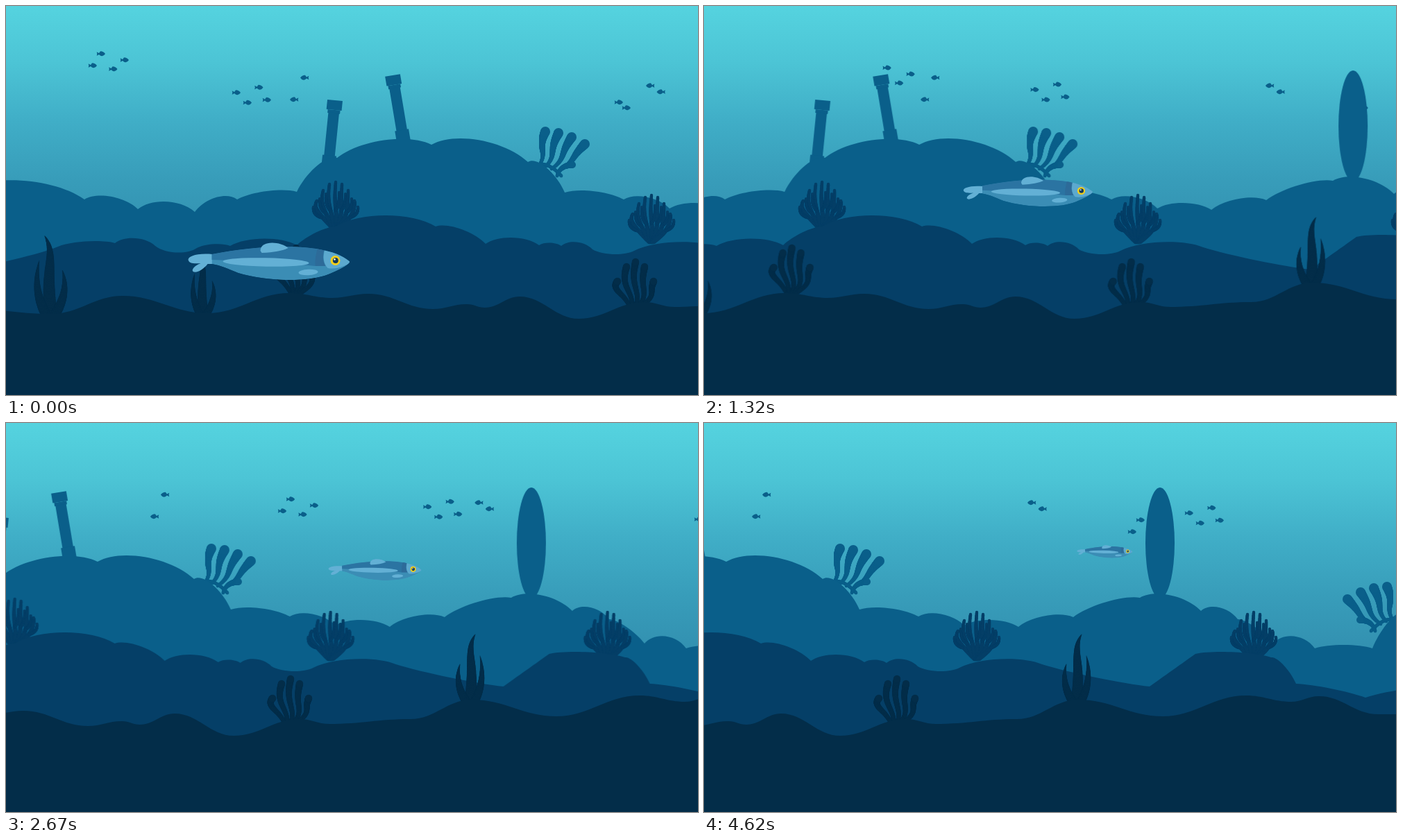
An HTML page with a canvas that plays this animation: 997 px wide and 561 px high, repeating every 4.65 s.

```html
<!DOCTYPE html>
<html lang="en">
<head>
<meta charset="utf-8">
<title>Under the sea</title>
<style>
html, body { margin: 0; width: 100%; height: 100%; overflow: hidden; background: #032d49; }
canvas { display: block; }
</style>
</head>
<body>
<canvas id="stage" width="997" height="561"></canvas>
<script>
const W = 997, H = 561, LOOP = 4650, STEP = 30, WORLD = 1700;
const FAR = '#0a5f8a', MID = '#053f67', NEAR = '#032d49';
const ctx = document.getElementById('stage').getContext('2d');

// Goes 0 to 1: linear, plus an early lead p that changes by q over the loop
const ease = (s, p = 0, q = 0) => s + s * (1 - s) * (p + q * s);

function layer(color, paint) {
  const c = document.createElement('canvas');
  c.width = WORLD; c.height = H;
  const g = c.getContext('2d');
  g.fillStyle = color;
  paint(g);
  return c;
}

function placed(g, x, y, sx, sy, paint) {
  g.save();
  g.translate(x, y);
  g.scale(sx, sy);
  paint();
  g.restore();
}

// Row of curves: each [end x, end y, rise of its middle over the chord]
function bumps(g, x, y, arcs) {
  g.beginPath();
  g.moveTo(x, y);
  for (const [ex, ey, rise] of arcs) {
    const dx = (ex - x) * 0.24, dy = (ey - y) * 0.24, lift = rise * 4 / 3;
    g.bezierCurveTo(x + dx, y + dy - lift, ex - dx, ey - dy - lift, ex, ey);
    x = ex; y = ey;
  }
  g.lineTo(WORLD, H); g.lineTo(-60, H); g.fill();
}

// Soft ground through its crests and valleys
function dunes(g, extrema) {
  g.beginPath();
  let [x, y] = extrema[0];
  g.moveTo(x, y);
  for (const [ex, ey] of extrema) {
    const bend = (ex - x) * 0.4;
    g.bezierCurveTo(x + bend, y, ex - bend, ey, ex, ey);
    x = ex; y = ey;
  }
  g.lineTo(WORLD, H); g.lineTo(-60, H); g.fill();
}

// Stem along a quadratic curve; its radius changes mostly near the tip
function limb(g, x0, y0, cx, cy, x1, y1, r0, r1, wave = 0) {
  for (let i = 0; i <= 60; i++) {
    const t = i / 60, s = 1 - t;
    g.beginPath();
    g.arc(s * s * x0 + 2 * s * t * cx + t * t * x1 + wave * Math.sin(t * 2 * Math.PI),
          s * s * y0 + 2 * s * t * cy + t * t * y1, r0 + (r1 - r0) * t ** 1.6, 0, 7);
    g.fill();
  }
}

function twigCoral(g, x, y) {
  for (let i = -3; i <= 3; i++) {
    const side = i < 0 ? -1 : 1, tip = 67 - 3 * i * i;
    limb(g, x + i, y, x + i * 11, y - 25, x + i * 9, y - tip, 3.2, 2.2, 1);
    limb(g, x + i * 7, y - tip * 0.4, x + i * 9 + side * 6, y - tip * 0.5,
         x + i * 9 + side * 5, y - tip * 0.78, 2.4, 2);
  }
}

function clubCoral(g, x, y) {
  for (let i = -2; i <= 2; i++)
    limb(g, x + i * 4, y, x + i * 15, y - 22, x + i * 13, y - 64 + 7 * i * i, 3, 5.2, 2.5);
}

function fanCoral(g, x, y, dir) {
  placed(g, x, y, dir, 1, () => {
    g.beginPath(); g.rect(0, 0, 80, 90); g.clip();
    for (let i = 0; i < 4; i++)
      limb(g, 2 + 8 * i, 54 + 4 * i, 4 + 16 * i, 36 + 4 * i, 9 + 19 * i, 8 + 2 * i * i, 2.4, 7, 2);
    limb(g, 0, 55, 16, 54, 32, 72, 2.4, 2.4);
    limb(g, 26, 72, 30, 57, 48, 56, 2.4, 5);
  });
}

function seaweed(g, x, y, size, dir) {
  placed(g, x, y, size * dir, size, () => {
    limb(g, 0, 2, -2, -70, 7, -95, 8, 0.5, 2);
    limb(g, -6, 2, -23, -25, -15, -52, 6, 0.5);
    limb(g, 6, 2, 22, -28, 14, -64, 6, 0.5);
  });
}

function column(g, x, y, height, lean) {
  g.save();
  g.translate(x, y);
  g.rotate(lean);
  g.fillRect(-11, 0, 22, 14);
  g.fillRect(-9, 14, 18, 5);
  g.fillRect(-7.8, 18, 15.6, height);
  g.fillRect(-10, height - 16, 20, 30);
  g.restore();
}

const far = layer(FAR, g => {
  column(g, 474, 136, 96, 0.1);
  column(g, 557, 100, 96, -0.165);
  fanCoral(g, 768, 173, 1);
  fanCoral(g, 1574, 228, -1);
  g.beginPath();
  g.ellipse(1238, 173, 21, 80, 0, 0, 7);
  g.fill();
  bumps(g, -60, 265, [
    [113, 279, 20], [190, 293, 11], [272, 297, 13], [333, 279, 12], [419, 268, 6.5], [477, 219, 13],
    [613, 200, 16], [752, 225, 19], [805, 269, 14], [890, 279, 7], [956, 292, 10], [1034, 294, 9],
    [1113, 280, 9], [1209, 252, 8], [1297, 271, 13], [1350, 283, 11], [1401, 318, 6], [1461, 325, 14],
    [1544, 325, 5], [1585, 273, 9], [1720, 270, 15]
  ]);
});

const mid = layer(MID, g => {
  twigCoral(g, 475, 321);
  twigCoral(g, 930, 340);
  twigCoral(g, 1329, 340);
  bumps(g, -60, 378, [
    [75, 347, -4], [157, 342, 5], [215, 346, 9], [275, 349, -8], [323, 346, 4], [419, 345, 10],
    [475, 318, 5], [619, 318, 16], [691, 343, 9], [768, 345, 10], [800, 346, 4], [845, 351, 8],
    [905, 353, -6], [1024, 348, 10], [1179, 380, -3], [1245, 333, 0], [1354, 338, 5], [1390, 376, 8],
    [1490, 396, 3], [1720, 385, 12]
  ]);
});

const near = layer(NEAR, g => {
  seaweed(g, 64, 442, 1.16, -1);
  seaweed(g, 284, 442, 0.87, -1);
  seaweed(g, 1166, 400, 1, 1);
  clubCoral(g, 418, 413);
  clubCoral(g, 907, 433);
  dunes(g, [
    [-60, 436], [65, 444], [168, 418], [290, 443], [408, 414], [470, 421], [522, 415], [615, 437],
    [664, 430], [690, 435], [740, 419], [825, 451], [920, 427], [963, 434], [1080, 427], [1168, 399],
    [1290, 423], [1410, 393], [1475, 402], [1515, 394], [1600, 420], [1760, 421]
  ]);
});

const schools = [
  { dir: 1, dx: s => 492 * ease(s, -0.18, 0.15), dy: s => 71 * s,
    at: [[137, 69], [125, 86], [171, 78], [154.5, 91]] },
  { dir: 1, dx: s => 367 * ease(s, 0.36, 0.6), dy: s => 5 * ease(s, -5.6),
    at: [[332, 125], [364.5, 117.5], [348, 139.5], [376, 135.5]] },
  { dir: -1, dx: s => -340 * ease(s, -0.06, 0.2), at: [[430, 103.5], [415, 135]] },
  { dir: -1, dx: s => -456 * ease(s, -0.22, 0.12), at: [[928, 115], [943.5, 124]] },
  { dir: 1, dx: s => 199 * s, at: [[883, 139], [894, 147]] }
];

const SMALL_FISH = new Path2D('M6 0Q3-4-1-3.7L-3-1L-6.3-2.8L-5.7 0L-6.3 2.8L-3 1Q2 6 6 0Z');

// Herring, drawn around its eye
const BODY = new Path2D('M-178-9C-140-16-110-20-72-20C-40-20 0-16 20 1C23 4 10 12-10 20C-40 32-100 30-140 18C-155 12-165 7-178 5Z');
const BACK = new Path2D('M-180-25H-14Q-24 0-29 8Q-90 2-180-1Z');
const HEAD = new Path2D('M-14-20Q-21 0-11 11Q0 13 12 8L30 0V-20Z');
const GILL = new Path2D('M-25-20H-14Q-21-4-14 8L-29 8Q-30-4-25-20Z');
const FIN = new Path2D('M-108-14C-108-29-80-28-68-18Q-80-12-106-11Z');
const TAIL = new Path2D('M-177-9C-200-11-212-6-212-1C-211 4-204 5-194 4C-202 7-208 13-205 16C-200 19-190 13-184 5L-177 5Z');

function oval(x, y, rx, ry, color, turn = 0) {
  ctx.fillStyle = color;
  ctx.beginPath();
  ctx.ellipse(x, y, rx, ry, turn, 0, 7);
  ctx.fill();
}

function shape(path, color) {
  ctx.fillStyle = color;
  ctx.fill(path);
}

function herring(s) {
  const x = 474.5 + 136 * ease(s, 1.16, -0.26);
  const y = 367 - 182 * ease(s, 1.46, -0.54);
  const size = 1 - 0.655 * ease(s, -0.1, 0.67);
  const flap = 0.92 + 0.08 * Math.cos(s * 5 * Math.PI);
  placed(ctx, x, y, size, size, () => {
    placed(ctx, 0, 0, 1, flap, () => shape(TAIL, '#63b0d5'));
    ctx.save();
    ctx.clip(BODY);
    shape(BODY, '#3b8db5');
    shape(BACK, '#2b74a2');
    shape(GILL, '#2d6b99');
    shape(HEAD, '#5ca9ce');
    ctx.restore();
    shape(FIN, '#63b0d5');
    oval(-100, 2.5, 62, 6.2, '#63b0d5', 0.02);
    oval(-39, 17, 14, 4.2, '#63b0d5', -0.05);
    oval(0, 0, 7, 7, '#f3cf1b');
    oval(0.3, 0, 4, 4, '#12395a');
    oval(-1, -1.6, 1.3, 1.3, '#f4f3dc');
  });
}

const water = ctx.createLinearGradient(0, 0, 0, 330);
['#55d3df', '#4cc4d5', '#40aec7', '#389dba', '#3290b0']
  .forEach((color, i) => water.addColorStop(i / 4, color));

function draw(now) {
  const last = LOOP - STEP;
  const s = Math.min(Math.floor(now % LOOP / STEP) * STEP, last) / last;
  ctx.fillStyle = water;
  ctx.fillRect(0, 0, W, H);
  for (const { dir, dx, dy, at } of schools)
    for (const [x, y] of at)
      placed(ctx, x + dx(s), y + (dy ? dy(s) : 0), dir, 1, () => shape(SMALL_FISH, FAR));
  ctx.drawImage(far, -581 * ease(s, 1.28, -0.44), 0);
  ctx.drawImage(mid, -537 * ease(s, 1.6, -0.76), 0);
  ctx.drawImage(near, -629 * ease(s, 0.87), 0);
  herring(s);
}

let start;
function tick(now) {
  start ??= now;
  draw(now - start);
  requestAnimationFrame(tick);
}
draw(0);
requestAnimationFrame(tick);
</script>
</body>
</html>
```
